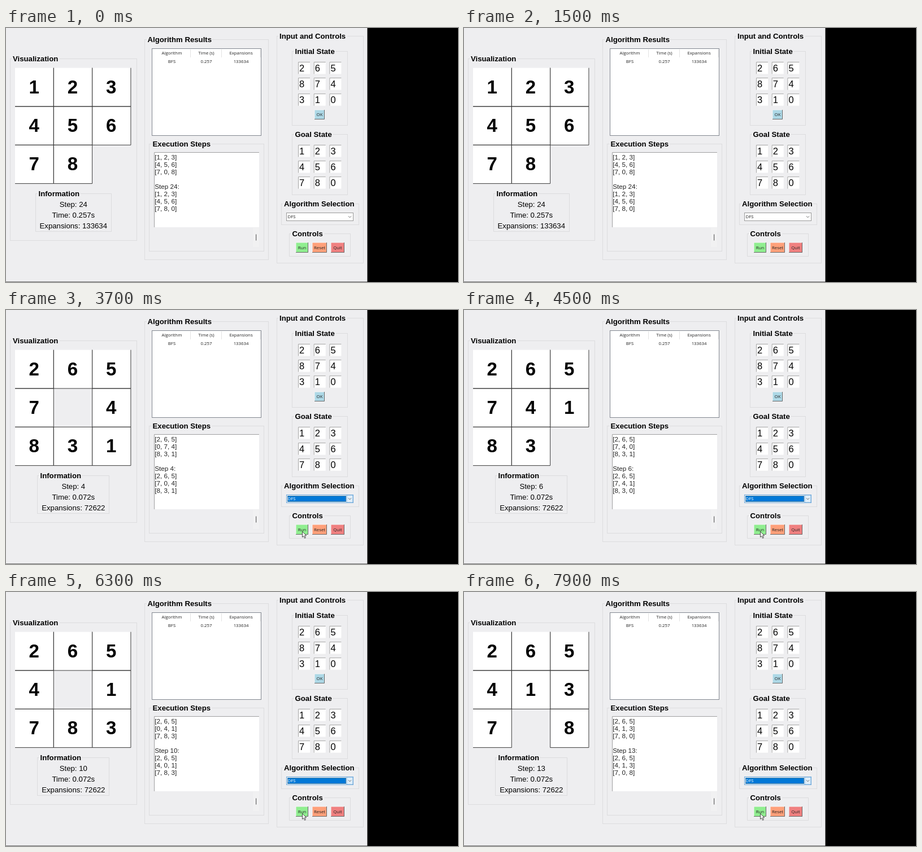
An HTML page for the animation above (8000 ms loop, 800 by 450 pixels).

```html
<!DOCTYPE html>
<html lang="en">
<head>
<meta charset="utf-8">
<title>8-puzzle solver</title>
<style>
  html, body { margin: 0; width: 100%; height: 100%; overflow: hidden; background: #000; }
  svg { display: block; width: 800px; height: 450px; }
  text { font-family: "Liberation Sans", Arial, sans-serif; font-size: 13.2px; fill: #000; white-space: pre; }
  .title { font-weight: bold; }
  .ui { font-family: "Open Sans", "Noto Sans", sans-serif; font-size: 7.8px; fill: #222; }
  .entry { font-size: 16.5px; }
  .tile { font-size: 33px; font-weight: bold; }
  .log { font-size: 11.7px; fill: #222; }
  .mid { text-anchor: middle; }
</style>
</head>
<body>
<svg id="stage" viewBox="0 0 800 450"></svg>
<script>
const LOOP = 8000, FRAME = 100;
const RUN_AT = 1600, STEP_BASE = 1550, STEP_MS = 460;
const BG = '#eeeef0';
const START = [2, 6, 5, 8, 7, 4, 3, 1, 0];
const GOAL = [1, 2, 3, 4, 5, 6, 7, 8, 0];
const BLANK_CYCLE = [8, 7, 6, 3, 4, 5];

const stage = document.getElementById('stage');

function add(tag, attrs, parent = stage) {
  const el = document.createElementNS('http://www.w3.org/2000/svg', tag);
  for (const key in attrs) el.setAttribute(key, attrs[key]);
  parent.appendChild(el);
  return el;
}
const group = (parent = stage) => add('g', {}, parent);

function rect(x, y, x2, y2, fill, stroke = 'none', parent = stage) {
  return add('rect', { x, y, width: x2 - x, height: y2 - y, fill, stroke }, parent);
}
function line(d, stroke, parent = stage, width = 1) {
  return add('path', { d, stroke, fill: 'none', 'stroke-width': width }, parent);
}
function label(x, y, str, cls = '', parent = stage) {
  const el = add('text', { x, y, class: cls }, parent);
  el.textContent = str;
  return el;
}

// Labelled frame: the title interrupts the top border
function panel(x, y, x2, y2, title, titleX, titleW, parent = stage) {
  rect(x + .5, y + .5, x2 + .5, y2 + .5, 'none', '#dcdcde', parent);
  rect(titleX - 2, y - 3, titleX + titleW, y + 4, BG, 'none', parent);
  label(titleX, y + 5, title, 'title', parent);
}

function button(x, y, x2, y2, fill, str) {
  rect(x, y, x2, y2, fill);
  line(`M${x} ${y2}V${y}H${x2}`, '#f4f4f4');
  line(`M${x} ${y2 - .5}H${x2 - .5}V${y}`, '#696969');
  label((x + x2) / 2, (y + y2) / 2 + 2.8, str, 'ui mid');
}

function entryGrid(top, values) {
  values.forEach((v, i) => {
    const x = 517 + (i % 3) * 27.7, y = top + Math.floor(i / 3) * 28.1;
    rect(x, y, x + 21, y + 21.5, '#fff');
    line(`M${x + .5} ${y + 21.5}V${y + .5}H${x + 21}`, '#a4a4a4');
    label(x + 2, y + 16.7, v, 'entry');
  });
}

function drawWindow() {
  rect(0, 0, 800, 450, '#000');
  rect(0, 0, 639.5, 449, BG);
  rect(0, 449, 639.5, 450, '#777');

  panel(7, 54, 231, 376, 'Visualization', 12, 83);

  panel(245, 20, 464, 410, 'Algorithm Results', 250.5, 114);
  rect(258.5, 36.5, 451.5, 190.5, '#fff', '#828790');
  line('M326.5 38V52M381.5 38V52M450 38V52', '#e2e2e2');
  [[293.5, 'Algorithm', 'BFS'], [354.5, 'Time (s)', '0.257'], [416, 'Expansions', '133634']]
    .forEach(([x, head, value]) => {
      label(x, 47.3, head, 'ui mid');
      label(x, 62.3, value, 'ui mid');
    });

  panel(253, 205, 456, 395, 'Execution Steps', 259.5, 105);
  rect(262, 220, 448, 353, '#fff');
  line('M262.5 353V220.5H448', '#a0a0a0');
  rect(437, 354, 448, 388, '#f1f1f2');
  line('M442.7 365.5V376.5', '#444');

  panel(479, 14, 632, 416, 'Input and Controls', 484, 120);
  panel(506, 41, 604, 172, 'Initial State', 511.5, 71);
  entryGrid(60, START);
  button(546, 145, 564, 162, '#add8e6', 'OK');
  panel(506, 188, 604, 295, 'Goal State', 511.5, 67);
  entryGrid(207, GOAL);
  panel(487, 311, 624, 348, 'Algorithm Selection', 492, 126);
  panel(501, 364, 609, 404, 'Controls', 506.5, 57);
  button(513, 380, 535, 398, '#90ee90', 'Run');
  button(542, 380, 568, 398, '#ffa07a', 'Reset');
  button(575, 380, 599, 398, '#f08080', 'Quit');
}

function drawCombo(parent, focused) {
  rect(496.5, 327.5, 614.5, 341.5, '#fff', focused ? '#6aa5d8' : '#9a9a9a', parent);
  if (focused) {
    rect(498, 329, 602, 340, '#0078d7', 'none', parent);
    add('rect', { x: 498.5, y: 329.5, width: 103, height: 10, fill: 'none',
      stroke: '#e08a30', 'stroke-width': .6, 'stroke-dasharray': '1 1' }, parent);
    rect(603, 328, 614, 341, '#e0eef9', '#7ab0dd', parent);
  }
  line('M606 333.3L608.5 335.8L611 333.3', '#555', parent, .9);
  label(498.5, 337.2, 'DFS', 'ui', parent).style.fill = focused ? '#fff' : '';
}

// Information frame shrinks to fit its widest line
function drawInfo(parent, x, x2, titleX, seconds, expansions) {
  panel(x, 293, x2, 360, 'Information', titleX, 74, parent);
  const step = label(119.3, 316.7, '', 'mid', parent);
  label(119.3, 335.7, `Time: ${seconds}s`, 'mid', parent);
  label(119.3, 354.7, `Expansions: ${expansions}`, 'mid', parent);
  return step;
}

function makeBoard() {
  const edge = i => 16 + i * 68.3;
  const top = i => 70.7 + i * 68.3;
  return GOAL.map((_, i) => {
    const col = i % 3, row = Math.floor(i / 3);
    const cell = group();
    rect(edge(col), top(row), edge(col + 1), top(row + 1), '#fff', 'none', cell);
    const digit = label(edge(col) + 33.7, top(row) + 45, '', 'tile mid', cell);
    return { cell, digit, col, row, edge, top };
  });
}

function boardAfter(step) {
  const cells = START.slice();
  for (let i = 1; i <= step; i++) {
    const from = BLANK_CYCLE[(i - 1) % 6], to = BLANK_CYCLE[i % 6];
    cells[from] = cells[to];
    cells[to] = 0;
  }
  return cells;
}

const rows = cells => [0, 3, 6].map(i => `[${cells.slice(i, i + 3).join(', ')}]`);

drawWindow();
const board = makeBoard();
const borders = line('', '#3c3c3c');
const logLines = Array.from({ length: 8 }, (_, i) => label(263.3, 233.2 + i * 13.03, '', 'log'));

const done = group(), running = group();
drawCombo(done, false);
drawCombo(running, true);
const doneStep = drawInfo(done, 52, 186, 57.5, '0.257', 133634);
const runStep = drawInfo(running, 55, 182, 60.5, '0.072', 72622);
add('path', { d: 'M524.5 392.5V402.5L526.8 400.4L528.6 404.3L530.3 403.5L528.5 399.8H531.6Z',
  fill: '#fff', stroke: '#222', 'stroke-width': .8 }, running);

function showBoard(cells) {
  let d = '';
  cells.forEach((value, i) => {
    const { cell, digit, col, row, edge, top } = board[i];
    cell.style.display = value ? '' : 'none';
    if (!value) return;
    digit.textContent = value;
    const l = edge(col), r = edge(col + 1), t = top(row), b = top(row + 1);
    d += `M${l} ${b}H${r}V${t}`;
    if (col) d += `M${l} ${t}V${b}`;
    if (row) d += `M${l} ${t}H${r}`;
  });
  borders.setAttribute('d', d);
}

function render(time) {
  const t = Math.floor((time % LOOP) / FRAME) * FRAME;
  const active = t >= RUN_AT;
  const step = active ? Math.floor((t - STEP_BASE) / STEP_MS) : 24;
  const cells = active ? boardAfter(step) : GOAL;
  const previous = active ? boardAfter(step - 1) : [1, 2, 3, 4, 5, 6, 7, 0, 8];

  showBoard(cells);
  const log = step ? [...rows(previous), ''] : [];
  log.push(`Step ${step}:`, ...rows(cells));
  logLines.forEach((el, i) => el.textContent = log[i] || '');

  done.style.display = active ? 'none' : '';
  running.style.display = active ? '' : 'none';
  (active ? runStep : doneStep).textContent = `Step: ${step}`;
}

const origin = performance.now();
function tick() {
  render(performance.now() - origin);
  requestAnimationFrame(tick);
}
tick();
</script>
</body>
</html>
```
